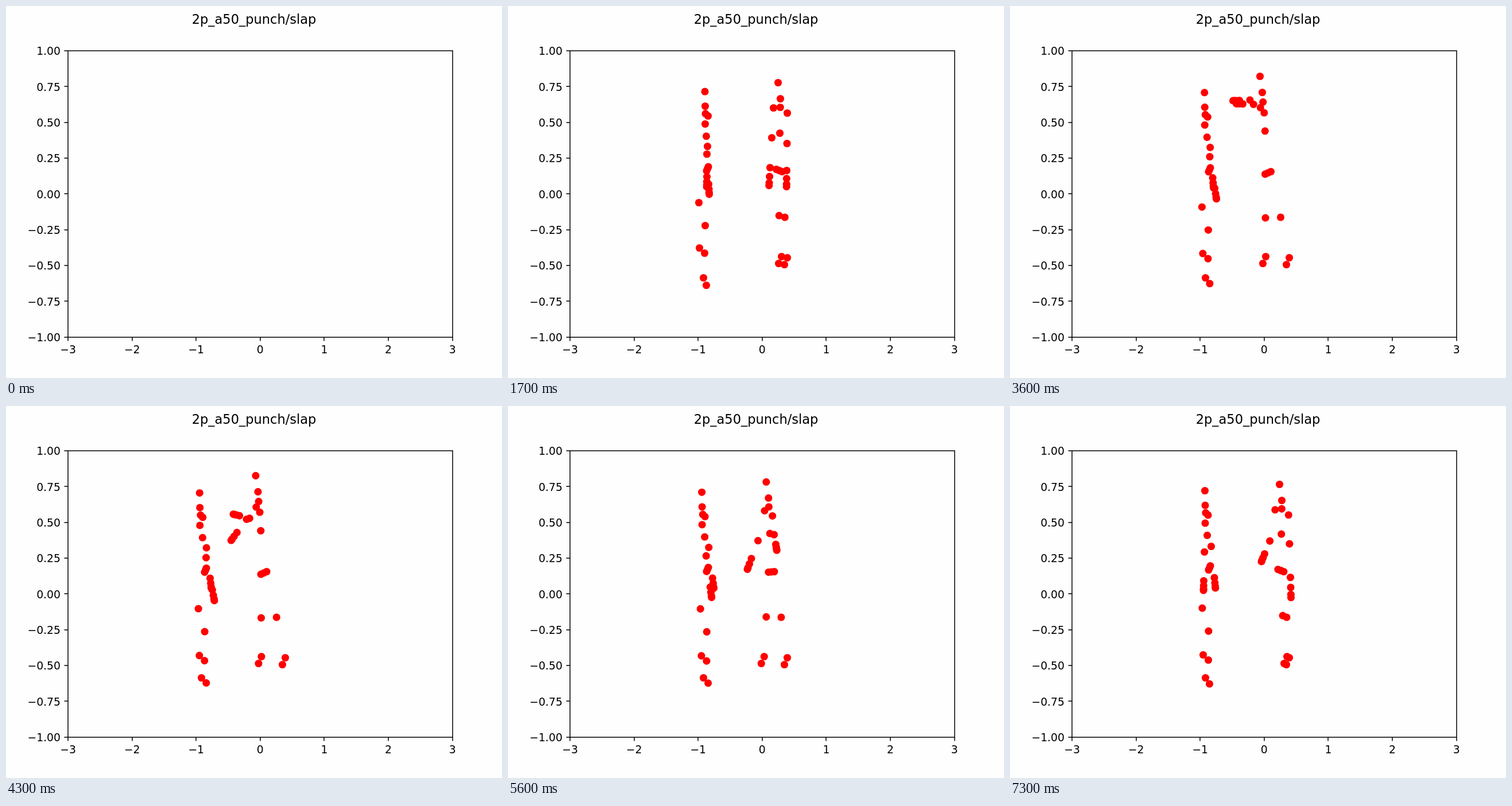
An HTML page that plays this animation: 864 px wide and 648 px high, repeating every 7.4 s.

```html
<!DOCTYPE html>
<html lang="en">
<head>
<meta charset="utf-8">
<title>Skeleton scatter plot</title>
<style>
  html, body { margin: 0; width: 100%; height: 100%; overflow: hidden; background: #fefefe; }
  svg { display: block; width: 864px; height: 648px; }
  text { font: 18.75px "DejaVu Sans", sans-serif; }
  .title { font-size: 22.5px; }
  #axes { fill: none; stroke: #000; stroke-width: 1.5; }
  circle { fill: #f00; }
</style>
</head>
<body>
<svg viewBox="0 0 864 648">
  <text class="title" x="432" y="30.5" text-anchor="middle">2p_a50_punch/slap</text>
  <g id="labels"></g>
  <g id="dots" transform="translate(.5 .5)"></g>
  <path id="axes"/>
</svg>
<script>
const LOOP = 7400, STEP = 100;
const byId = id => document.getElementById(id);

function add(parent, tag, attrs, text = '') {
  const el = document.createElementNS('http://www.w3.org/2000/svg', tag);
  for (const [name, value] of Object.entries(attrs)) el.setAttribute(name, value);
  el.textContent = text;
  parent.append(el);
  return el;
}

function drawAxes() {
  const left = 108, top = 77.76, width = 669.6, height = 498.96;
  const bottom = Math.round(top + height), right = Math.round(left + width);
  const label = (x, y, anchor, value) => add(byId('labels'), 'text',
    { x, y, 'text-anchor': anchor }, String(value).replace('-', '\u2212'));
  let d = `M${left} ${Math.round(top)}H${right}V${bottom}H${left}Z`;
  for (let v = -3; v <= 3; v++) {
    const x = left + (v + 3) / 6 * width;
    d += `M${Math.round(x)} ${bottom}v6.56`;
    label(x, 605, 'middle', v);
  }
  for (let i = 0; i <= 8; i++) {
    const y = top + i / 8 * height;
    d += `M${left} ${Math.round(y)}h-6.56`;
    label(94.9, Math.round(y + 7.4), 'end', (1 - i / 4).toFixed(2));
  }
  byId('axes').setAttribute('d', d);
}

// Each pose is held from start to end. Hands are wrist x, y and elbow sag.
// flinch and turn drive the person who is hit; the rest drives the one who hits.
const poses = [
  { start: 100, end: 1700, flinch: 0, turn: 0,
    neck: [474, 161], step: 476, left: [456, 281, 0], right: [485, 286, 3] },
  { start: 2800, end: 2800, flinch: 0, turn: 0,
    neck: [458, 158], step: 446, left: [438, 198, 24], right: [452, 242, 23] },
  { start: 3250, end: 3600, flinch: .6, turn: 0,
    neck: [439, 150], step: 445, left: [399, 164, -7], right: [405, 170, -7] },
  { start: 4900, end: 4900, flinch: 1, turn: 0,
    neck: [438, 148], step: 444, left: [404, 264, 4], right: [407, 207, 19] },
  { start: 6150, end: 6400, flinch: .6, turn: .6,
    neck: [464, 168], step: 447, left: [437, 266, 15], right: [507, 264, 0] },
  { start: 7300, end: 7300, flinch: .5, turn: 1,
    neck: [473, 164], step: 482, left: [443, 257, 16], right: [488, 298, -4] }
];

const mix = (a, b, k) => Array.isArray(a) ? a.map((v, i) => mix(v, b[i], k)) : a + (b - a) * k;
const shift = ([x, y], dx, dy) => [x + dx, y + dy];

function poseAt(time) {
  const i = poses.findLastIndex(p => p.start <= time);
  const from = poses[i], to = poses[i + 1] ?? from;
  const u = Math.max(0, (time - from.end) / (to.start - from.end || 1));
  const k = u * u * (3 - 2 * u);
  return Object.fromEntries(Object.keys(from).map(key => [key, mix(from[key], to[key], k)]));
}

function torso(neck, hips, tiltX, tiltY) {
  return [neck, mix(neck, hips, .12), mix(neck, hips, .48), hips,
    shift(hips, -tiltX, -tiltY), shift(hips, tiltX, tiltY)];
}

// The hand carries on in the direction of the forearm.
function arm(shoulder, [x, y, sag], reach) {
  const wrist = [x, y], elbow = shift(mix(shoulder, wrist, .5), 0, sag);
  const along = k => mix(elbow, wrist, 1 + reach * k);
  return [shoulder, elbow, wrist, along(.5), along(.85), along(1)];
}

function hitter({ neck, step, left, right }) {
  const [x, y] = neck;
  const lean = 474 - x;
  const hips = [472 - lean * .66, 286 + lean * .12];
  const tilt = 2 - lean * .12;
  const half = 12 - lean / 4, drop = 20 + lean * .3;
  const leg = (side, ankle) => [
    mix(shift(hips, side * 5, side * tilt), ankle, .53), ankle, shift(ankle, -5, 12)];
  return [
    shift(neck, -4, -28),
    ...torso(neck, hips, 5, tilt),
    ...arm([x - half, y + drop - 4], left, .6),
    ...arm([x + half, y + drop + 5], right, .6),
    ...leg(-1, [step, 436]), ...leg(1, [486, 438])
  ];
}

function victim({ flinch, turn }) {
  const neck = [343 - 7 * flinch, 174 + 3 * flinch - 3 * turn];
  const hips = [347, neck[1] + 109];
  const sink = 16 * flinch + 4 * turn;
  const sunk = (x, y, k) => [x + sink * k / 4, y + sink * k];
  return [
    shift(neck, -.5, -25.5),
    ...torso(neck, hips, 1.5, -3.5),
    ...arm(shift(neck, 5, 17), [346 + 11 * flinch + 4 * turn, 297 + 3 * flinch, 0], .33),
    ...arm(shift(neck, 0, 31), [349 + 12 * flinch - 18 * turn, 310 + 12 * flinch - 12 * turn, 0], .33),
    sunk(332, 342, .8), sunk(333, 421, 1), [340, 473],
    sunk(343, 382, .8), sunk(342, 430, 1), [345 + 4 * flinch, 486 - 5 * flinch]
  ];
}

const joints = pose => [...victim(pose), ...hitter(pose)];
const group = byId('dots');
const dots = joints(poses[0]).map(() => add(group, 'circle', { r: 6.55 }));

function render(now) {
  const time = Math.floor(Math.max(0, now - start) % LOOP / STEP) * STEP;
  group.style.display = time < STEP ? 'none' : '';
  if (time >= STEP) {
    joints(poseAt(time)).forEach(([x, y], i) => {
      dots[i].setAttribute('cx', x);
      dots[i].setAttribute('cy', y);
    });
  }
  requestAnimationFrame(render);
}

drawAxes();
const start = performance.now();
render(start);
</script>
</body>
</html>
```
